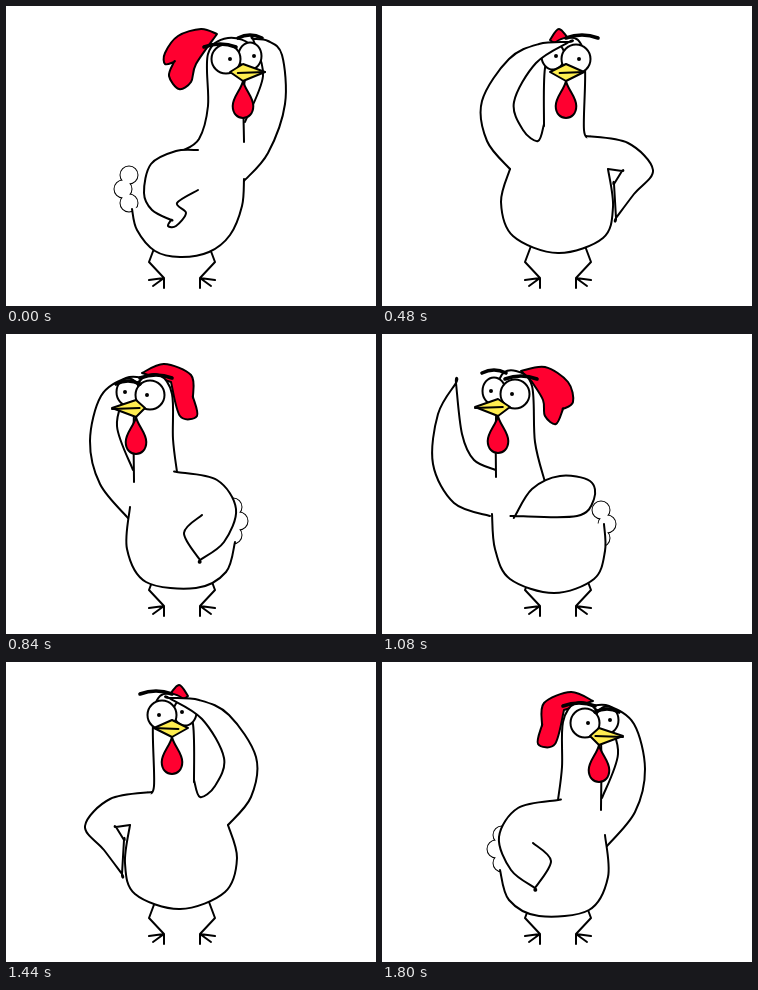
An HTML page that plays this animation: 370 px wide and 300 px high, repeating every 1.92 s.

```html
<!DOCTYPE html>
<html lang="en">
<head>
<meta charset="utf-8">
<title>Lookout hen</title>
<style>
html, body { margin: 0; width: 100%; height: 100%; overflow: hidden; background: #fff; }
svg { display: block; width: 370px; height: 300px; }
path, ellipse { stroke: #000; stroke-width: 2; stroke-linecap: round; stroke-linejoin: round; fill: #fff; }
.red { fill: #ff0030; }
.beak { fill: #ffee50; }
.line { fill: none; }
.brow { fill: none; stroke-width: 3.6; }
.bare { stroke: none; }
.pupil { fill: #000; }
</style>
</head>
<body>
<svg id="stage" viewBox="0 0 370 300"></svg>
<script>
const STEP = 120, COUNT = 16;
const stage = document.getElementById('stage');

// Key poses. Outlines pass smoothly through their points; "!" marks a corner.
// face: chin x, y; beak ends; eye offsets; which eye is near; gaze; brow lifts.
const right = {
  flip: 348, over: 0, tail: [123, 183],
  face: [237, 75, -13, 22, -17, 7, 0, 4, 11, 20],
  comb: '211,28 195,23 172,30 159,47 159,58 168,56! 163,70 173,83 185,76 190,58 211,28',
  arm: '238,175 262,147 279,98 276,49 262,35 247,33! 257,70 239,116',
  neck: '176,145 193,133 202,100 202,48 222,32 246,42 238,80 238,136',
  body: '126,203 131,224 149,245 174,251 203,246 224,229 236,200 238,173',
  wing: '192,144 170,145 145,158 138,187 146,204 165,214! 162,220 170,220 180,207 171,197 192,184'
};
const wave = {
  flip: 348, over: 0, tail: [219, 190],
  face: [116, 82, -23, 12, -4, 17, 1, -3, 20, 14],
  comb: '139,37 163,33 186,48 191,68 181,75! 174,90 163,82 161,66 150,48',
  arm: '108,182 72,169 51,130 56,80 74,49! 80,100 92,126 114,136',
  neck: '114,143 114,85 118,44 134,37 150,52 153,108 163,148',
  body: '110,180 113,215 128,245 172,259 212,245 223,217 222,190',
  wing: '133,182! 150,155 178,142 208,147 212,165 195,182 133,182!'
};
const turn = {
  flip: 348, over: 1, tail: [135, 188],
  face: [224, 76, -14, 19, -20, 4, 0, 0, 0, 23],
  comb: '180,30 199,21 215,32 190,60 187,80! 180,79 178,60',
  arm: '155,169 142,144 137,104 147,54 174,32 199,28 215,34! 199,41 182,62 177,94 186,131',
  neck: '186,131 189,80 192,48 216,36 230,60 226,110 226,129',
  body: '144,146 128,174 125,209 141,236 189,250 224,231 237,195 237,172',
  wing: '226,129! 250,140 265,172 258,199 237,206! 237,172! 242,178'
};
const front = {
  flip: 350, over: 1, tail: [210, 190],
  face: [184, 75, -16, 18, -13, 10, 1, 3, 0, 20],
  comb: '168,34 177,23 187,36 178,42',
  arm: '128,163 105,135 100,95 127,53 157,38 187,36! 154,57 132,96 141,124 156,135 162,118',
  neck: '162,120 163,62 174,36 196,34 203,62 202,124 209,131',
  body: '128,163 119,196 131,230 176,247 221,232 231,201 226,163',
  wing: '204,130 246,137 271,164 252,188 234,212! 232,178! 240,165! 226,163'
};
const left = {
  flip: 347, over: 0, tail: [227, 187],
  face: [130, 83, -24, 9, -8, 14, 1, -3, 10, 16],
  comb: '136,39 158,30 185,41 187,63! 191,82 174,82 165,48',
  arm: '122,184 94,150 84,107 95,62 120,44 138,44! 122,58 111,92 127,136',
  neck: '128,148 128,80 134,47 153,41 166,60 167,105 171,138',
  body: '124,173 121,215 140,248 190,254 220,238 229,208',
  wing: '171,138! 211,146 230,175 218,208 194,226! 178,199 196,181'
};

function curve(text) {
  const pts = [];
  for (const word of text.split(' ')) {
    const p = word.replace('!', '').split(',').map(Number);
    pts.push(p);
    if (word.endsWith('!')) pts.push(p);
  }
  let d = 'M' + pts[0];
  for (let i = 1; i < pts.length; i++) {
    const a = pts[i - 1], b = pts[i];
    const before = pts[i - 2] || a, after = pts[i + 1] || b;
    const c1 = a.map((v, k) => v + (b[k] - before[k]) / 6);
    const c2 = b.map((v, k) => v - (after[k] - a[k]) / 6);
    d += `C${c1} ${c2} ${b}`;
  }
  return d;
}

function sample(d, n = 70) {
  const path = document.createElementNS('http://www.w3.org/2000/svg', 'path');
  path.setAttribute('d', d);
  const len = path.getTotalLength();
  return Array.from({ length: n + 1 }, (_, i) => path.getPointAtLength(len * i / n));
}

const lerp = (a, b, t) => a + (b - a) * t;

function mixPath(a, b, t) {
  const q = sample(b);
  return 'M' + sample(a).map((p, i) => [lerp(p.x, q[i].x, t), lerp(p.y, q[i].y, t)]).join('L');
}

function mixValue(a, b, t) {
  if (Array.isArray(a)) return a.map((v, i) => lerp(v, b[i], t));
  return typeof a === 'string' ? mixPath(a, b, t) : lerp(a, b, t);
}

const mapPose = (pose, fn) =>
  Object.fromEntries(Object.entries(pose).map(([key, v]) => [key, fn(v, key)]));
const build = pose => mapPose(pose, v => typeof v === 'string' ? curve(v) : v);
const mix = (a, b, t) => mapPose(a, (v, key) => mixValue(v, b[key], t));

const shape = (d, cls = '') => `<path class="${cls}" d="${d}"/>`;
const oval = (x, y, rx, ry, cls = '') =>
  `<ellipse class="${cls}" cx="${x}" cy="${y}" rx="${rx}" ry="${ry}"/>`;
const mirror = (art, sum) => `<g transform="matrix(-1 0 0 1 ${sum} 0)">${art}</g>`;

// Three feathers in a column, the middle one further out.
function tail([x, y], chinX) {
  const out = Math.sign(x - chinX) * 6;
  const puffs = cls => [-1, 1, 0].map(k => oval(x + (k ? 0 : out), y + 14 * k, 8.5, 8.5, cls)).join('');
  return puffs('') + puffs('bare');
}

function drop(x, top, w = 10.3) {
  const low = top + 37;
  return `M${x},${top}C${x + 2},${top + 9} ${x + w},${low - 21} ${x + w},${low - 12}` +
    `C${x + w},${low + 4} ${x - w},${low + 4} ${x - w},${low - 12}` +
    `C${x - w},${low - 21} ${x - 2},${top + 9} ${x},${top}Z`;
}

function drawFace([x, y, beakL, beakR, eyeL, eyeR, near, look, liftL, liftR]) {
  const eye = (dx, size) => {
    const ex = x + dx, ey = y - 25 + 3 * size;
    return oval(ex, ey, 11.5 + 3 * size, 13.5 + size) + oval(ex + look, ey, 1, 1, 'pupil');
  };
  const brow = (dx, lift, size) => {
    if (lift < 8) return '';
    const bx = x + dx + 6 * size * Math.sign(dx), by = y - 23 - lift, half = 12 + 4 * size;
    return shape(`M${bx - half},${by}Q${bx},${by - 6} ${bx + half},${by}`, 'brow');
  };
  const eyes = [eye(eyeL, 1 - near), eye(eyeR, near)];
  if (near < 0.5) eyes.reverse();
  const lip = beakR > -beakL ? [beakL * 0.4, beakR] : [beakL, beakR * 0.4];
  return {
    skin: eyes.join('') + shape(drop(x, y), 'red') +
      shape(`M${x + beakL},${y - 9}L${x},${y - 17}L${x + beakR},${y - 9}L${x},${y}Z`, 'beak') +
      shape(`M${x + lip[0]},${y - 8}L${x + lip[1]},${y - 9}`, 'line'),
    brows: brow(eyeL, liftL, 1 - near) + brow(eyeR, liftR, near)
  };
}

function draw(p) {
  const arm = shape(p.arm), over = p.over > 0.5, face = drawFace(p.face);
  return shape(p.comb + 'Z', 'red') + tail(p.tail, p.face[0]) + (over ? '' : arm) +
    shape(p.body) + shape(p.neck) + shape(p.wing) +
    face.skin + (over ? arm : '') + face.brows;
}

const foot = shape('M149,240L143,256L158,272L143,274M158,272L147,280M158,272L158,282', 'line');
const feet = foot + mirror(foot, 352);

const [R, W, T, F, L] = [right, wave, turn, front, left].map(build);
const half = [R, W, T, mix(T, F, 1 / 2), F, mix(F, L, 1 / 3), mix(F, L, 2 / 3), L];

// The second half of the loop mirrors the first; the wave is drawn facing left.
const scenes = Array.from({ length: COUNT }, (_, i) => {
  const pose = half[i % 8], art = draw(pose);
  const flipped = (i >= 8) !== (pose === W);
  return feet + (flipped ? mirror(art, pose.flip) : art);
});

let shown = -1;
function show(time) {
  const i = Math.floor(time / STEP) % COUNT;
  if (i !== shown) stage.innerHTML = scenes[shown = i];
}

const start = performance.now();
function tick() {
  show(performance.now() - start);
  requestAnimationFrame(tick);
}
tick();
</script>
</body>
</html>
```
